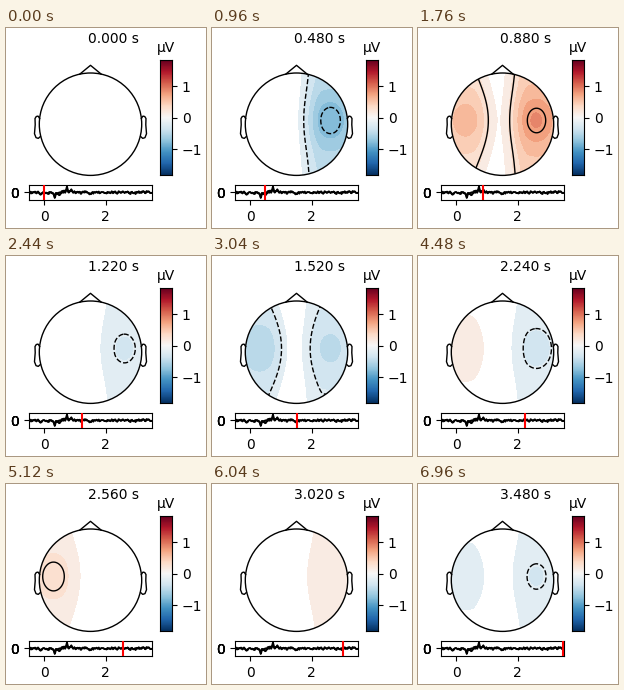
Write a matplotlib script that moves like this. It is 200x200 px and loops after 7000 ms.

```python
import numpy as np
import matplotlib.pyplot as plt
from matplotlib.animation import FuncAnimation
from matplotlib.colors import BoundaryNorm, ListedColormap
from matplotlib.patches import Circle

SIZE, FRAMES, STEP = 200, 175, 0.02
CX, CY, RADIUS = 84.5, 96.2, 51.2
VMAX = 1.82
LEVELS = np.linspace(-VMAX, VMAX, 8)[1:-1]

plt.rcParams.update({"font.family": "DejaVu Sans", "font.size": 10})
fig = plt.figure(figsize=(2, 2), dpi=100, facecolor="white")


def pixel_axes(left, top, right, bottom):
    return fig.add_axes([left / SIZE, 1 - bottom / SIZE,
                         (right - left) / SIZE, (bottom - top) / SIZE])


# (time, left amplitude, right amplitude)
KEYS = [(0, 0, 0), (0.34, -1.1, -1.6), (0.48, 0, -0.86), (0.74, 1, 1.6),
        (0.88, 0.61, 0.85), (1.52, -0.565, -0.47), (1.92, 0, 0),
        (2.56, 0.295, 0), (3.48, -0.2, -0.285)]


def make_signals(times):
    """Smoothed noise that passes through the key amplitudes."""
    rng = np.random.default_rng(7)
    kernel = np.hanning(5)[1:-1]
    kernel /= np.sqrt((kernel ** 2).sum())
    noise = np.array([np.convolve(rng.normal(size=times.size), kernel, "same")
                      for _ in range(3)])
    spread = 0.23 + 0.35 * np.exp(-((times - 0.55) / 0.28) ** 2)
    sides = spread * (0.75 * noise[0] + 0.65 * noise[1:])
    for t, *amps in KEYS:
        pull = np.exp(-((times - t) / 0.04) ** 2)
        sides = sides * (1 - pull) + np.outer(amps, pull)
    return sides


times = np.arange(-25, FRAMES + 1) * STEP
signals = make_signals(times)


def smoothstep(x):
    x = np.clip(x, 0, 1)
    return x * x * (3 - 2 * x)


def lobe(x, y, start, full, peak, base, bend):
    """Curved plateau toward one side of the head plus a bump at the sensor."""
    dy = y - 92.5
    curved = x + bend * (dy / 45) ** 2
    bump = np.exp(-((x - peak) / 15) ** 2 / 2 - (dy / 20) ** 2 / 2)
    return base * smoothstep((curved - start) / (full - start)) + (1 - base) * bump


gx, gy = np.meshgrid(np.arange(32.25, 138, 0.5), np.arange(43.75, 149, 0.5))
left_lobe = lobe(gx, gy, 84, 58, 47.5, 0.48, 6)
right_lobe = lobe(gx, gy, 78, 110, 118.5, 0.52, -1)

# Stepped colours, white around zero
steps = 0.15 * np.arange(13)
bounds = np.r_[-0.12 - steps[::-1], 0.07 + steps]
mids = (bounds[:-1] + bounds[1:]) / 2
rdbu = plt.get_cmap("RdBu_r")
colors = rdbu(0.5 + mids / (2 * VMAX))
colors[len(mids) // 2] = 1
bands = ListedColormap(colors)

# Head
head = pixel_axes(0, 0, SIZE, SIZE)
head.axis("off")
image = head.imshow(np.zeros_like(gx), extent=(32, 138, 149, 43.5), cmap=bands,
                    norm=BoundaryNorm(bounds, bands.N), aspect="auto",
                    interpolation="nearest")
head.set(xlim=(0, SIZE), ylim=(SIZE, 0))
outline = Circle((CX, CY), RADIUS, fill=False, lw=1, ec="k", zorder=5)
head.add_patch(outline)
image.set_clip_path(outline)

ear_x = np.array([.497, .510, .518, .5299, .5419, .54, .547, .532, .510, .489])
ear_y = np.array([.0555, .0775, .0783, .0746, .0555,
                  -.0055, -.0932, -.1313, -.1384, -.1199])
nose_x, nose_y = np.array([-.209, 0, .209]), np.array([.978, 1.15, .978])
for x, y in [(nose_x, nose_y), (2 * ear_x, 2 * ear_y), (-2 * ear_x, 2 * ear_y)]:
    head.plot(CX + RADIUS * x, CY - RADIUS * y, "k", lw=1, zorder=5)

title = head.text(81.7, 15, "", ha="left", va="baseline")
head.text(160, 24, "µV", ha="center", va="baseline")

# Colour bar
bar = pixel_axes(154, 32.4, 166, 147.4)
bar.imshow(np.linspace(-1, 1, 256)[:, None], cmap=rdbu, aspect="auto",
           origin="lower", extent=(0, 1, -VMAX, VMAX))
bar.set(xticks=[], yticks=[-1, 0, 1])
bar.yaxis.tick_right()

# Signal strip
strip = pixel_axes(23, 156.5, 146.2, 172)
for signal in (*signals, signals.mean(axis=0) * 0.6):
    strip.plot(times, signal, "k", lw=1.1)
strip.set(xlim=(-0.5, 3.52), ylim=(-2.1, 2.1), xticks=[0, 2], yticks=[0])
strip.set_yticklabels([""])
for _ in range(4):
    head.text(13.2, 165, "0", ha="right", va="center_baseline")
cursor = strip.axvline(0, color="r", lw=1.5, zorder=4)

contours = []


def update(i):
    while contours:
        contours.pop().remove()
    t = i * STEP
    left, right = signals[:, i + 25]
    field = np.clip(left * left_lobe + right * right_lobe, -1.8, 1.8)
    image.set_data(field)
    levels = [v for v in LEVELS if field.min() < v < field.max()]
    if levels:
        lines = head.contour(gx, gy, field, levels, colors="k", linewidths=1)
        lines.set_clip_path(outline)
        contours.append(lines)
    title.set_text(f"{t:.3f} s")
    cursor.set_xdata([t, t])


anim = FuncAnimation(fig, update, frames=FRAMES, interval=40, repeat=True,
                     repeat_delay=0, blit=False)
plt.show()
```
